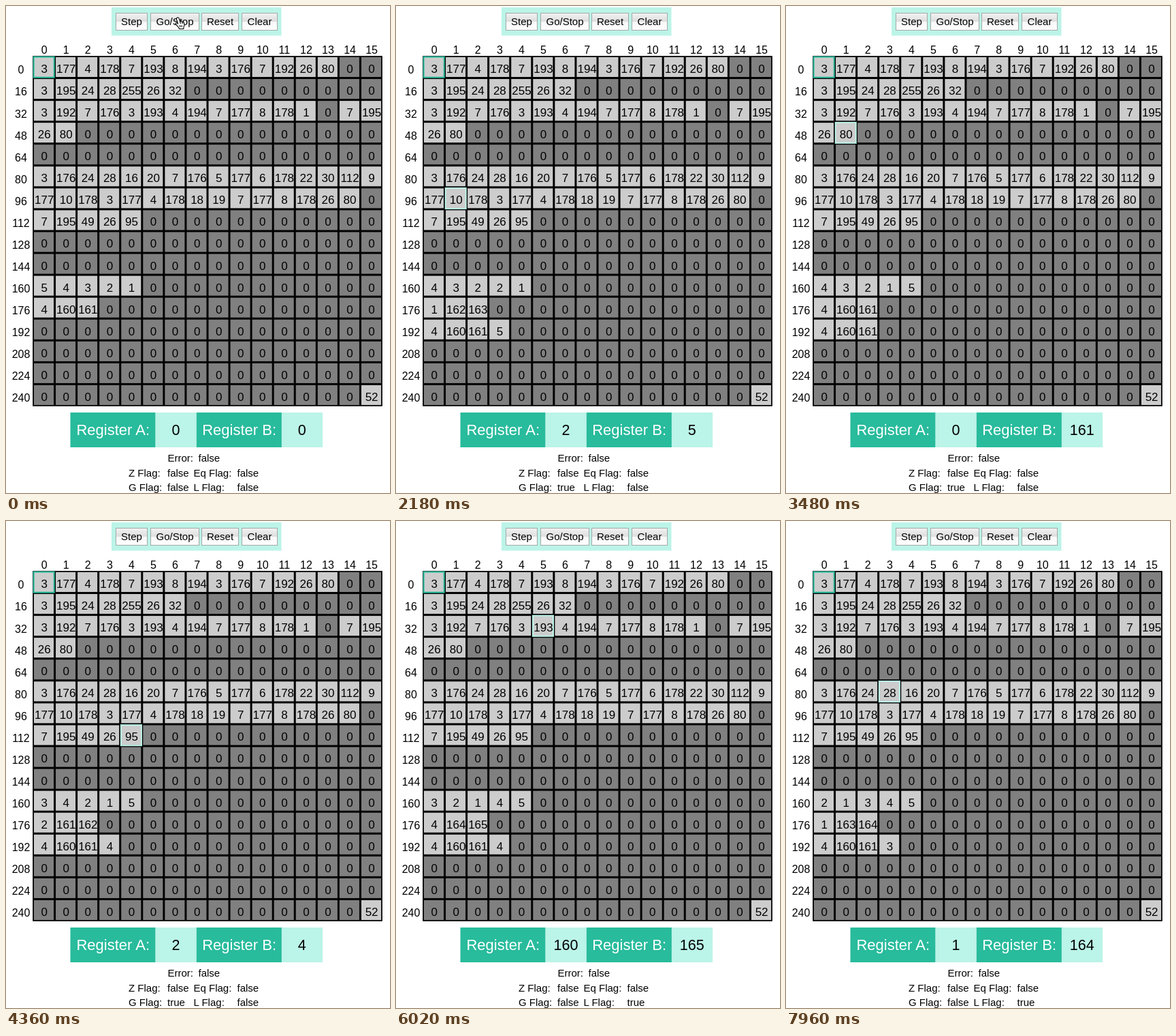
Write an HTML page that moves like this. It is 564 px wide and 714 px high and loops after 8000 ms.

```html
<!DOCTYPE html>
<html lang="en">
<head>
<meta charset="utf-8">
<title>Memory machine</title>
<style>
  html, body { margin: 0; width: 100%; height: 100%; overflow: hidden; background: #fff; }
  svg { display: block; width: 564px; height: 714px; font-family: "Liberation Sans", Arial, sans-serif; }
</style>
</head>
<body>
<svg id="stage" viewBox="0 0 564 714">
  <defs>
    <linearGradient id="btn" x1="0" y1="0" x2="0" y2="1">
      <stop offset="0" stop-color="#f2f2f2"/>
      <stop offset=".48" stop-color="#dedede"/>
      <stop offset=".52" stop-color="#f7f7f7"/>
      <stop offset="1" stop-color="#fff"/>
    </linearGradient>
  </defs>
</svg>
<script>
const LOOP = 8000;
const TEAL = '#28bb9c', MINT = '#bbf4e8', LIGHT = '#cccccc', DARK = '#808080';
const X0 = 39.2, Y0 = 73.2, PITCH = 32.06;

const PROGRAM = {
  0: [3, 177, 4, 178, 7, 193, 8, 194, 3, 176, 7, 192, 26, 80],
  16: [3, 195, 24, 28, 255, 26, 32],
  32: [3, 192, 7, 176, 3, 193, 4, 194, 7, 177, 8, 178, 1, 0, 7, 195, 26, 80],
  80: [3, 176, 24, 28, 16, 20, 7, 176, 5, 177, 6, 178, 22, 30, 112, 9,
       177, 10, 178, 3, 177, 4, 178, 18, 19, 7, 177, 8, 178, 26, 80],
  112: [7, 195, 49, 26, 95],
  160: [5, 4, 3, 2, 1],
  176: [4, 160, 161],
  255: [52]
};

// The screen refreshes every 60 ms, counted afresh from each of these times.
const ANCHORS = [360, 1130, 1190, 1950, 2000, 2760, 2820, 3590, 3680, 3760, 4540,
  4590, 5360, 6130, 6190, 6990, 7050, 7840, 7900, 7960, LOOP];
// [time, bytes fetched so far]
const CLOCK = [[416, 0], [1310, 55], [2180, 109], [3480, 188], [4360, 244],
  [6020, 345], [6190, 356], [7960, 464]];

// Instructions that take the next byte as operand
const WIDE = {
  1: (m, v) => { m.a = v; },
  3: (m, v) => { m.a = m.mem[v]; },
  4: (m, v) => { m.b = m.mem[v]; },
  5: (m, v) => { m.a = m.mem[m.mem[v]]; },
  6: (m, v) => { m.b = m.mem[m.mem[v]]; },
  7: (m, v) => { m.mem[v] = m.a; },
  8: (m, v) => { m.mem[v] = m.b; },
  9: (m, v) => { m.mem[m.mem[v]] = m.a; },
  10: (m, v) => { m.mem[m.mem[v]] = m.b; },
  26: (m, v) => { m.pc = v; },
  28: (m, v) => { if (m.z) m.pc = v; },
  30: (m, v) => { if (m.g) m.pc = v; }
};
const SHORT = {
  18: m => { m.a++; },
  19: m => { m.b++; },
  20: m => { m.a--; },
  22: m => { m.eq = m.a === m.b; m.g = m.a > m.b; m.l = m.a < m.b; },
  24: m => { m.z = m.a === 0; },
  49: m => { [m.a, m.b] = [m.b, m.a]; }
};

function run(count) {
  const m = { mem: new Array(256).fill(0), a: 0, b: 0, pc: 0, at: -1, op: 0,
    z: false, eq: false, g: false, l: false };
  for (const start in PROGRAM) PROGRAM[start].forEach((v, i) => { m.mem[+start + i] = v; });
  for (let i = 0; i < count; i++) {
    const byte = m.mem[m.at = m.pc++];
    if (m.op) { WIDE[m.op](m, byte); m.op = 0; }
    else if (WIDE[byte]) m.op = byte;
    else if (SHORT[byte]) SHORT[byte](m);
  }
  return m;
}

const svg = document.getElementById('stage');
function add(tag, attrs, parent = svg) {
  const el = document.createElementNS('http://www.w3.org/2000/svg', tag);
  for (const k in attrs) el.setAttribute(k, attrs[k]);
  return parent.appendChild(el);
}
const rect = (x, y, width, height, fill, more) => add('rect', { x, y, width, height, fill, ...more });
function text(str, x, y, size, anchor = 'start', fill = '#000') {
  const el = add('text', { x, y, 'font-size': size, 'text-anchor': anchor, fill });
  el.textContent = str;
  return el;
}
const left = i => X0 + i % 16 * PITCH;
const top_ = i => Y0 + Math.floor(i / 16) * PITCH;
const frame = (i, stroke) => rect(left(i) + 1.5, top_(i) + 1.5, 30, 30, 'none', { stroke, 'stroke-width': 2 });

// Toolbar
rect(155, 2, 249.5, 41.5, MINT);
[['Step', 161, 46], ['Go/Stop', 212, 71], ['Reset', 287, 54], ['Clear', 346, 52]].forEach(([s, x, w]) => {
  rect(x + .5, 10.5, w, 25, 'url(#btn)', { stroke: '#a3a9a7' });
  text(s, x + w / 2 + .5, 28, 15, 'middle');
});

// Memory grid
rect(X0, Y0, PITCH * 16 + .6, PITCH * 16 + .6, '#000');
for (let i = 0; i < 16; i++) {
  text(i, left(i) + 17, 69.5, 16, 'middle');
  text(i * 16, 22, top_(i * 16) + 26.2, 16, 'middle');
}
const cells = [];
for (let i = 0; i < 256; i++) {
  cells.push({
    box: rect(left(i) + 1.8, top_(i) + 1.8, PITCH - 3, PITCH - 3, DARK),
    label: text('0', left(i) + 17, top_(i) + 24.8, 17, 'middle')
  });
}
frame(0, TEAL);
const mark = frame(0, MINT);

// Registers
const [regA, regB] = ['A', 'B'].map((name, i) => {
  const x = 94.5 + i * 185.3;
  rect(x, 596, 125.2, 51, TEAL);
  rect(x + 125, 596, 60.3, 51, MINT);
  text(`Register ${name}:`, x + 62.8, 629, 22, 'middle', '#fff');
  return text('0', x + 155, 629, 21.5, 'middle');
});

// Flags
function flag(name, x, valueX, y) {
  text(name, x, y, 15);
  return text('false', valueX, y, 15);
}
flag('Error:', 237.5, 282.5, 668);
const flags = {
  z: flag('Z Flag:', 180, 237, 689.5),
  eq: flag('Eq Flag:', 275.5, 339.5, 689.5),
  g: flag('G Flag:', 180, 237, 710.5),
  l: flag('L Flag:', 275.5, 339.5, 710.5)
};

const hand = add('path', {
  d: 'M251 17.5q1.6-1.6 3 .4l1.6 5 1.6-.4 1.5.6 1.4.2 1.2 1.2q1.4 3-.3 6.3l-.2 2.7h-6.3l-.8-1.8-4.6-5.4q-.2-2 2-1.4l1.6 1.2-2.2-6.6q-.3-1.3.5-2Z' +
     'M255.6 23l.8 3M258.7 23.2l.6 3M255.4 28l.4 3M258 28l.2 3',
  fill: '#fff', stroke: '#000', 'stroke-width': 1.1, 'stroke-linejoin': 'round'
});

function snap(t) {
  const i = ANCHORS.findIndex(a => a > t);
  if (i < 1) return 0;
  const from = ANCHORS[i - 1], last = Math.round((ANCHORS[i] - from) / 60) - 1;
  return from + 60 * Math.max(0, Math.min(Math.floor((t - from) / 60), last));
}

function fetched(t) {
  if (t <= CLOCK[0][0]) return 0;
  const i = Math.max(1, CLOCK.findIndex(k => k[0] >= t));
  const [t0, n0] = CLOCK[i - 1], [t1, n1] = CLOCK[i];
  return Math.floor(n0 + (n1 - n0) * (t - t0) / (t1 - t0) + 1e-6);
}

function show(t) {
  const m = run(fetched(t));
  m.mem.forEach((v, i) => {
    cells[i].box.setAttribute('fill', v ? LIGHT : DARK);
    cells[i].label.textContent = v;
  });
  mark.style.display = m.at < 0 ? 'none' : '';
  if (m.at >= 0) {
    mark.setAttribute('x', left(m.at) + 1.5);
    mark.setAttribute('y', top_(m.at) + 1.5);
  }
  regA.textContent = m.a;
  regB.textContent = m.b;
  for (const k in flags) flags[k].textContent = m[k];
  hand.style.display = t < ANCHORS[0] ? '' : 'none';
}

let shown = -1;
const begin = performance.now();
function tick() {
  const t = snap((performance.now() - begin) % LOOP);
  if (t !== shown) show(shown = t);
  requestAnimationFrame(tick);
}
tick();
</script>
</body>
</html>
```
